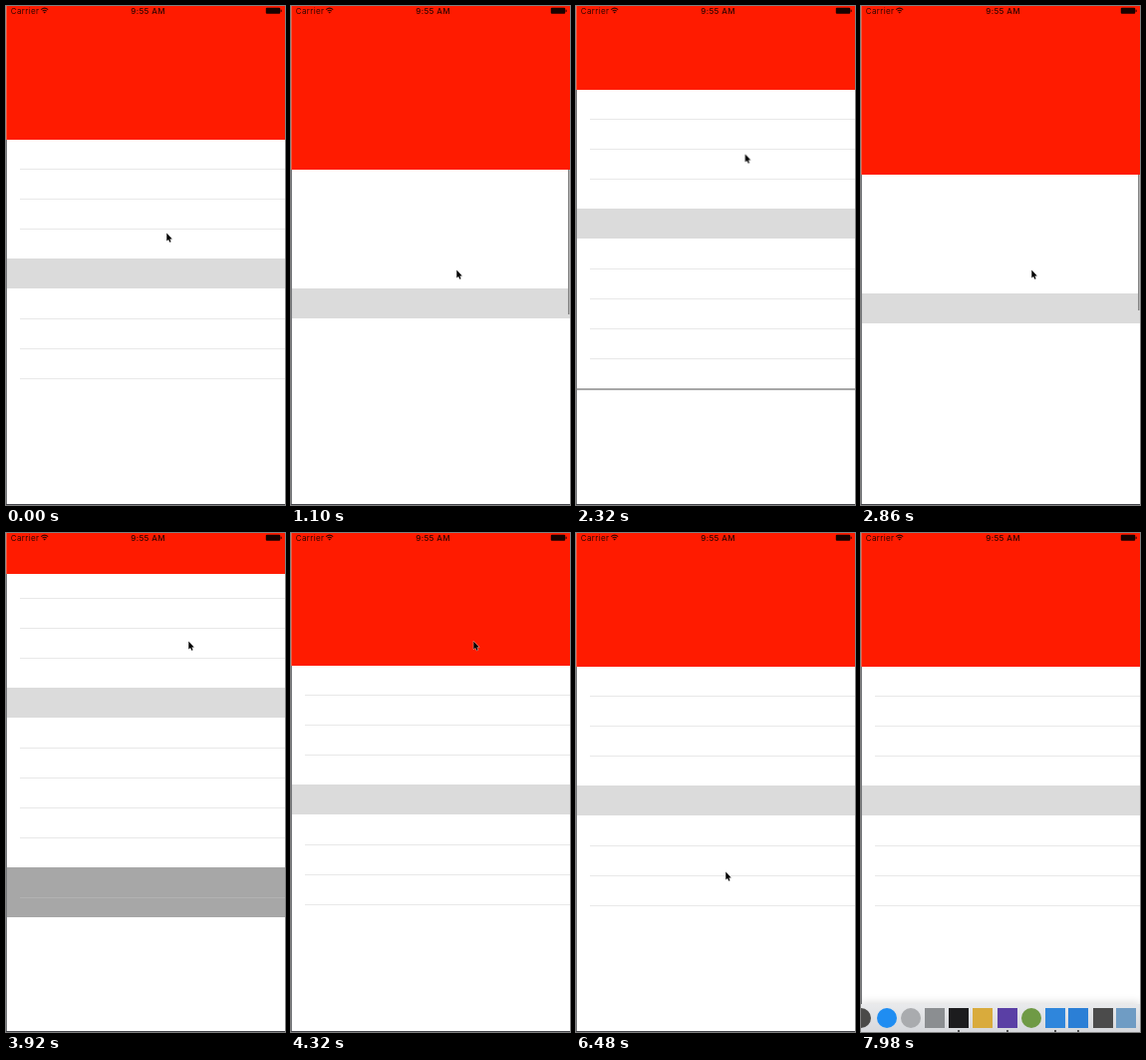
Recreate the animation shown at these times as an HTML page. Size 280 by 500 pixels, loop 8000 ms.

```html
<!DOCTYPE html>
<html lang="en">
<head>
<meta charset="utf-8">
<title>Stretchy header</title>
<style>
  /* --y: scroll position, the top of the list in px */
  @property --y { syntax: "<number>"; inherits: true; initial-value: 133; }

  html, body { margin: 0; width: 100%; height: 100%; overflow: hidden; background: #fff; }
  div, svg { position: absolute; }
  .stage {
    width: 280px; height: 500px; overflow: hidden; background: #fff;
    animation: scroll 8s infinite;
  }

  .table { top: 0; left: 0; width: 280px; height: 385px; overflow: hidden; }
  .list { top: calc(var(--y) * 1px); left: 0; width: 280px; height: 500px; }
  .rows, .backdrop::after {
    background: linear-gradient(var(--line) 1px, #0000 0) 0 0 / 100% 30px;
    left: 14px; right: 0; top: 0; bottom: 0;
  }
  .rows { --line: #e8e8e8; opacity: calc(135 - var(--y)); }
  .section {
    top: 120px; width: 280px; height: 30px;
    background: #dbdbdb; box-shadow: 0 1px #fff;
  }
  .backdrop { --line: #b2b2b2; top: 300px; width: 280px; height: 200px; background: #a7a7a7; }
  .backdrop::after { content: ""; position: absolute; top: 30px; }

  .edge { left: 0; top: 0; width: 1px; height: 500px; background: #77797c; }
  .base { left: 0; top: 499px; width: 280px; height: 1px; background: #44454a; }
  .header {
    top: 0; left: 0; width: 280px; background: #ff1b00;
    height: max(41px, calc((var(--y) + 1) * 1px));
    box-shadow: inset 1px 0 #ee5a40;
  }
  .bar {
    left: 278px; width: 1px; background: #858585; border-right: 1px solid #b0b0b0;
    top: calc((var(--y) + 1) * 1px);
    height: calc((455 - 1.9 * var(--y)) * 1px);
    opacity: calc(var(--y) - 134);
  }

  .status {
    left: 0; top: 0; fill: #300500;
    font-family: Inter, Roboto, sans-serif; font-size: 8px; letter-spacing: .32px;
  }

  .cursor { left: 0; top: 0; overflow: visible; animation: point 8s infinite; }

  .dock {
    left: 0; top: 472px; width: 280px; height: 28px;
    background: linear-gradient(#e9eaec, #d6d8dc);
    box-shadow: 0 -2px 8px #0002;
    animation: dock 8s infinite;
  }
  .dock i { position: absolute; top: 4px; width: 20px; height: 20px; background: var(--c); }
  .dock i.round { border-radius: 50%; }
  .dock i.open::after {
    content: ""; position: absolute; left: 9px; top: 22px;
    width: 2px; height: 2px; border-radius: 50%; background: #222;
  }

  @keyframes scroll {
    0%, .25% { --y: 133; animation-timing-function: ease-in-out; }
    4%, 5%   { --y: 158; animation-timing-function: cubic-bezier(.2, .53, .35, 1); }
    9.25%, 10.5% { --y: 133; animation-timing-function: ease-out; }
    13.75% { --y: 163; animation-timing-function: ease-in-out; }
    23%, 23.75% { --y: 2; animation-timing-function: ease-in-out; }
    34.5%  { --y: 170; animation-timing-function: ease-in; }
    35.75% { --y: 168; animation-timing-function: ease-in-out; }
    45.5%, 47.75% { --y: -8; animation-timing-function: ease-in; }
    49%    { --y: 34; animation-timing-function: cubic-bezier(.2, .53, .35, 1); }
    54.75%, 58.25% { --y: 133; animation-timing-function: ease-out; }
    60.5%  { --y: 160; animation-timing-function: ease-in-out; }
    62.5%  { --y: 142; animation-timing-function: cubic-bezier(.2, .53, .35, 1); }
    67.75%, 100% { --y: 133; }
  }
  @keyframes point {
    0%, .25% { transform: translate(161px, 227px); animation-timing-function: ease-in-out; }
    4%, 5%   { transform: translate(162px, 275px); animation-timing-function: ease-in-out; }
    9.25%, 10.5% { transform: translate(164px, 206px); animation-timing-function: ease-out; }
    13.75% { transform: translate(166px, 264px); animation-timing-function: ease-in-out; }
    23%, 23.75% { transform: translate(168px, 37px); animation-timing-function: ease-in-out; }
    34.5%  { transform: translate(171px, 267px); animation-timing-function: ease-in; }
    35.75% { transform: translate(171px, 264px); animation-timing-function: ease-in-out; }
    45.5%, 58.25% { transform: translate(183px, 108px); animation-timing-function: ease-in; }
    62%    { transform: translate(200px, 505px); animation-timing-function: step-end; }
    70.75% { transform: translate(277px, 200px); animation-timing-function: ease-out; }
    75.5%, 79% { transform: translate(150px, 288px); animation-timing-function: ease-in-out; }
    85%, 100% { transform: translate(150px, 505px); }
  }
  @keyframes dock {
    0%, 84% { transform: translateY(40px); animation-timing-function: ease-out; }
    88.75%, 100% { transform: none; }
  }
</style>
</head>
<body>
<div class="stage">
  <div class="table">
    <div class="list">
      <div class="rows"></div>
      <div class="section"></div>
      <div class="backdrop"></div>
    </div>
  </div>
  <div class="edge"></div>
  <div class="base"></div>
  <div class="header"></div>
  <div class="bar"></div>

  <svg class="status" width="280" height="12">
    <text x="4.8" y="7.5">Carrier</text>
    <path d="M35.2 3.6Q38.7 .6 42.2 3.6M36.6 5.2Q38.7 3.4 40.8 5.2" fill="none" stroke="#300500" stroke-width="1.1"/>
    <path d="M37.4 6.1Q38.7 5.2 40 6.1L38.7 7.6Z"/>
    <text x="142.6" y="7.5" text-anchor="middle" font-weight="500">9:55 AM</text>
    <rect x="260.8" y="1.8" width="14.4" height="6" rx="1" fill="#170200"/>
    <rect x="275.6" y="3.7" width="1" height="2.2" fill="#170200"/>
  </svg>

  <div class="dock" id="dock"></div>

  <svg class="cursor" width="8" height="12">
    <path d="M.3 .6V8.4L2.1 6.9L3.3 9.8L4.6 9.2L3.4 6.4H5.8Z" stroke="#fff" stroke-width=".7" paint-order="stroke"/>
  </svg>
</div>
<script>
  // centre x, colour, classes
  const icons = [
    [0, "#4a4a48", "round"], [26, "#1f8df2", "round"], [50, "#a9abae", "round"],
    [74, "#8b8e91", ""], [98, "#1c1c1e", "open"], [122, "#d9ab3c", ""],
    [147, "#5a3fa5", "open"], [171, "#6f9a45", "round"], [195, "#2f86dc", "open"],
    [218, "#2b7fd6", "open"], [243, "#4b4b4b", ""], [266, "#6f9cc4", ""]
  ];
  const dock = document.getElementById("dock");
  for (const [x, color, kind] of icons) {
    const icon = document.createElement("i");
    icon.className = kind;
    icon.style.left = x - 10 + "px";
    icon.style.setProperty("--c", color);
    dock.append(icon);
  }
</script>
</body>
</html>
```
